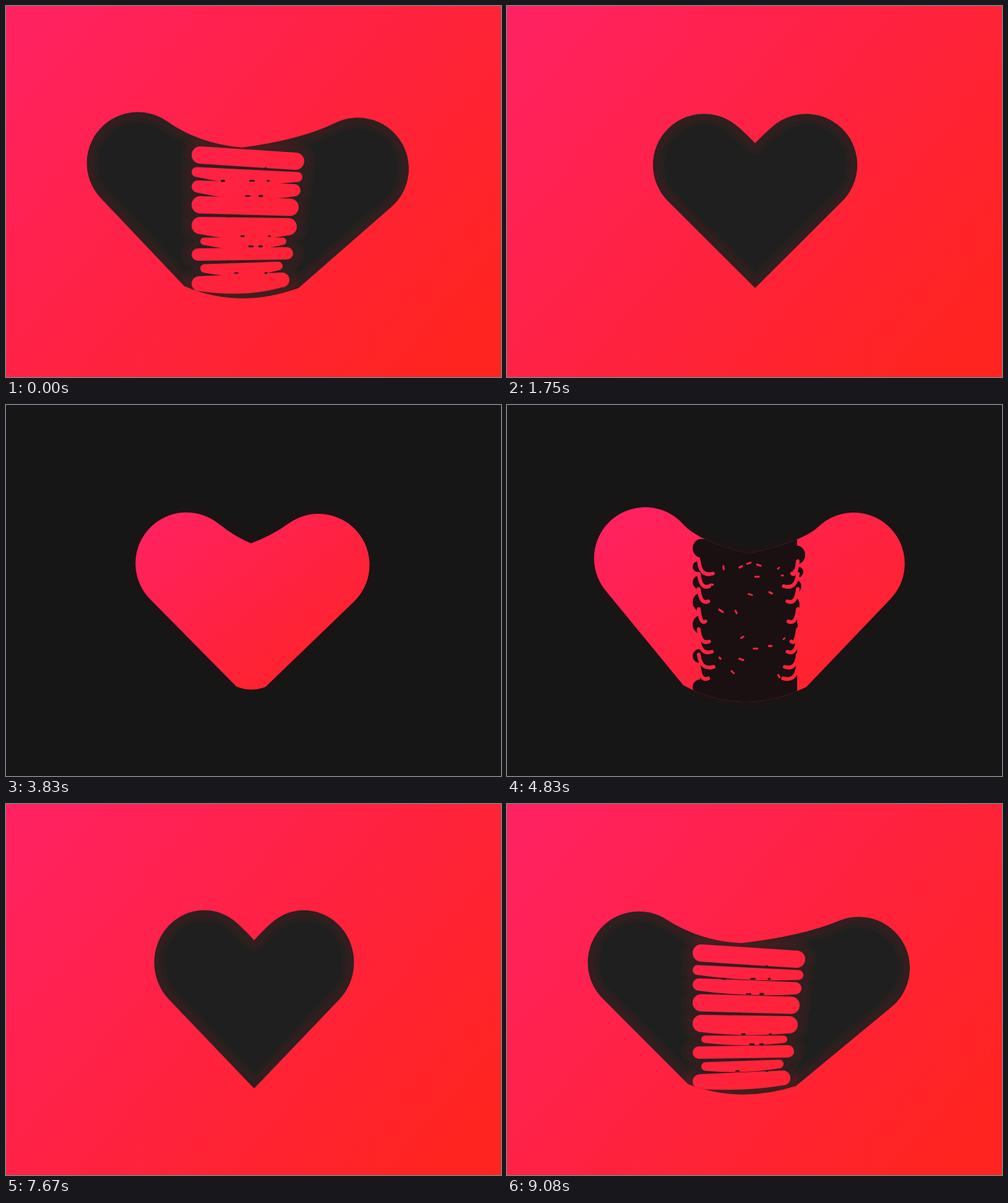
Animation of 800x600 px, one loop 9160 ms. Source, as an HTML page with a canvas:

```html
<!DOCTYPE html>
<html lang="en">
<head>
<meta charset="utf-8">
<title>Heart tearing apart</title>
<style>
  html, body { margin: 0; width: 100%; height: 100%; overflow: hidden; background: #161616; }
  canvas { display: block; width: 800px; height: 600px; }
</style>
</head>
<body>
<canvas id="stage" width="800" height="600"></canvas>
<script>
const ctx = document.getElementById('stage').getContext('2d');
const LOOP = 9160, HALF = LOOP / 2, SWAP = 2420;
const RADIUS = 82.5, MID_X = 386, MID_Y = 355;
const RIM = 'rgba(255, 40, 30, .04)';

const clamp = v => Math.min(1, Math.max(0, v));
const span = (p, from, to) => clamp((p - from) / (to - from));
const smooth = u => u * u * (3 - 2 * u);
const inOutCubic = u => u < .5 ? 4 * u ** 3 : 1 - 4 * (1 - u) ** 3;
const lerp = (a, b, u) => a + (b - a) * u;
const random = seed => { const v = Math.sin(seed * 12.9898) * 43758.5453; return v - Math.floor(v); };

// Slits opening between the strands, stacked from top to bottom; the strands get thinner ends.
const GAP = 4.5;
let rowTop = 232;
const ROWS = [14, 8, 10, 14, 14, 6, 10, 7, 12].map((r, i) => {
  const y = rowTop + r;
  rowTop += 2 * r + GAP;
  const indent = r < 8 ? 14 : 0;
  return { r, y, left: 300 + indent, right: 482 - 3 * i - indent, tilt: 5 - i, sag: i % 3 ? 14 : 0 };
});

function gradient(x0, y0, x1, y1) {
  const g = ctx.createLinearGradient(x0, y0, x1, y1);
  g.addColorStop(0, '#ff2264');
  g.addColorStop(.5, '#ff2242');
  g.addColorStop(1, '#ff2420');
  return g;
}
const RED_STAGE = gradient(0, 0, 685, 603);

// Diagonal gradient whose bands run parallel to the other diagonal of the box.
function boxGradient(x, y, w, h) {
  const k = 2 * w * h / (w * w + h * h);
  return gradient(x, y, x + k * h, y + k * w);
}

// How far the halves are apart, 1 = fully.
function apart(p) {
  return p < 2000 ? Math.max(0, 1 - ((p + 80) / 727) ** 3) : inOutCubic(span(p, 3530, 4290));
}

// Recoil of the halves: they sink a little while held and rise once torn.
function recoil(p) {
  return p < 2000 ? span(p, 0, 250) * (1 - span(p, 250, 600))
                  : -.35 * span(p, 3900, 4300) * (1 - span(p, 4500, HALF));
}

function poseAt(p) {
  const s = apart(p), k = recoil(p);
  return {
    left: [318.5 - 105.5 * s, 257 - 3 * s - 6.5 * k],
    right: [483.5 + 85 * s, 257 + 6 * s - 6 * k],
    leftBend: [390 - 80 * s - 8 * k, 210 + 12 * s],
    notch: [401 - 20 * s + 7 * k, 222 + 7 * s + 12 * k],
    rightBend: [412 + 66 * s + 6 * k, 210 + 6 * s + 6 * k],
    footLeft: [401 - 113 * s - 14 * k, 456 - 3 * s],
    foot: [401 - 24 * s, 456 + 35 * s + 18 * k],
    footRight: [401 + 72 * s + 18 * k, 456]
  };
}

function squash(p) {
  if (p < 2400) {
    const q = p - 833;
    const dent = q < 0 ? Math.sin(Math.PI / 2 * span(p, 647, 833))
                       : Math.exp(-q / 210) * Math.cos(2 * Math.PI * q / 400);
    return [1 - .218 * dent, 1 - .057 * dent];
  }
  const wind = smooth(span(p, 2900, 3400)) - smooth(span(p, 3500, 3850));
  return [1 - .07 * wind, 1 + .075 * wind];
}

// Angle on a lobe where a line to the given point touches it.
function tangent([cx, cy], [px, py], side) {
  const dx = px - cx, dy = py - cy;
  return Math.atan2(dy, dx) + side * Math.acos(Math.min(1, RADIUS / Math.hypot(dx, dy)));
}

function bodyPath({ left, right, leftBend, notch, rightBend, footLeft, foot, footRight }) {
  const path = new Path2D();
  path.arc(...left, RADIUS, tangent(left, footLeft, 1), tangent(left, leftBend, -1));
  path.quadraticCurveTo(...leftBend, ...notch);
  const from = tangent(right, rightBend, 1);
  path.quadraticCurveTo(...rightBend, right[0] + RADIUS * Math.cos(from), right[1] + RADIUS * Math.sin(from));
  path.arc(...right, RADIUS, from, tangent(right, footRight, -1));
  path.lineTo(...footRight);
  path.quadraticCurveTo(...foot, ...footLeft);
  path.closePath();
  return path;
}

function addSlit(path, row, open, sag) {
  const r = row.r * open, reach = .5 + .5 * open;
  const x0 = MID_X + (row.left - MID_X) * reach + r, x1 = MID_X + (row.right - MID_X) * reach - r;
  const y0 = row.y - row.tilt, y1 = row.y + row.tilt;
  path.moveTo(x0, y0 + r);
  path.arc(x0, y0, r, Math.PI / 2, -Math.PI / 2);
  path.arc(x1, y1, r, -Math.PI / 2, Math.PI / 2);
  path.quadraticCurveTo(MID_X, row.y + r + row.sag * sag, x0, y0 + r);
}

function addTear(path, width) {
  const left = lerp(MID_X, 312, width), right = lerp(MID_X, 469, width);
  path.moveTo(left, 456);
  path.lineTo(left, 233);
  path.quadraticCurveTo(MID_X, 254, right, 226);
  path.lineTo(right, 456);
  path.quadraticCurveTo(MID_X, 496, left, 456);
}

function holesPath(p) {
  const early = p < 2000;
  const open = early ? 1 : smooth(span(p, 3920, 4480));
  const path = new Path2D(), placed = new Path2D();
  if (open === 0 || early && p > 647) return path;
  ROWS.forEach(row => addSlit(path, row, open, early ? 1 : span(p, 4420, HALF)));
  if (early && p > 20) addTear(path, Math.sqrt(span(p, 20, 250)));
  const sx = early && p > 251 ? apart(p) / .905 : 1;
  const sy = early ? 1 + 2.5 * span(p, 245, 500) : 1;
  placed.addPath(path, new DOMMatrix([sx, 0, 0, sy, MID_X * (1 - sx), MID_Y * (1 - sy)]));
  return placed;
}

// Snapped strands hang from both edges of the opening.
function drawStubs(p) {
  const weight = 6 * span(p, 100, 250) * (1 - span(p, 270, 450));
  if (weight <= 0) return;
  ctx.lineWidth = weight;
  ROWS.slice(1).forEach((row, i) => {
    const y = row.y - row.r;
    for (const [edge, dir] of [[310, 1], [470, -1]]) {
      const length = 8 + 16 * random(i * 2 + dir);
      ctx.beginPath();
      ctx.moveTo(edge, y - 12);
      ctx.quadraticCurveTo(edge + dir * 3, y + 14, edge + dir * length, y + 8);
      ctx.stroke();
    }
  });
}

function crumb(x, y, dx, dy, weight) {
  ctx.lineWidth = weight;
  ctx.beginPath();
  ctx.moveTo(x - dx, y - dy);
  ctx.lineTo(x + dx, y + dy);
  ctx.stroke();
}

function drawCrumbs(p) {
  const early = p < 2000;
  if (!early && p < 4420) return;
  const loose = early ? span(p, 0, 250) : 0;
  const fall = early ? 300 * (Math.max(0, p - 250) / 583) ** 2 : 0;
  for (let i = 0; i < 18; i++) {
    const row = ROWS[1 + i % 8];
    const x = MID_X + (random(i + 1) - .5) * lerp(80, 125, loose);
    const y = row.y - row.r - GAP / 2 + (random(i + 40) - .5) * 18 * loose;
    crumb(x, y + fall * 1.4, 1 + i % 3, (i % 4 - 1) * loose, 2.5 + random(i));
  }
  // Slower ones shaken out of the lobes.
  if (early && p > 250) for (let i = 0; i < 6; i++) {
    crumb(236 + 57 * i, 274 - 24 * random(i + 3) + fall, i % 3 ? .3 : 3, i % 3 ? 2.5 : 1, 3);
  }
}

function draw(t) {
  const p = t % HALF;
  const dark = t >= SWAP && t < SWAP + HALF;
  const pose = poseAt(p), body = bodyPath(pose), holes = holesPath(p);
  const [sx, sy] = squash(p);
  const stage = dark ? '#161616' : RED_STAGE;
  const edge = pose.left[0] - RADIUS, top = pose.left[1] - RADIUS;
  const goo = dark
    ? boxGradient(edge, top, pose.right[0] + RADIUS - edge, (pose.foot[1] + pose.footLeft[1]) / 2 - top)
    : '#1f1f1f';

  ctx.fillStyle = stage;
  ctx.fillRect(0, 0, 800, 600);

  ctx.save();
  ctx.translate(401, 290);
  ctx.scale(sx, sy);
  ctx.translate(-401, -290);
  if (dark) {
    ctx.shadowColor = 'rgba(45, 12, 14, .4)';
    ctx.shadowBlur = 30;
  }
  ctx.fillStyle = goo;
  ctx.fill(body);
  ctx.shadowColor = 'transparent';
  ctx.clip(body);
  if (!dark) {
    ctx.strokeStyle = RIM;
    for (const width of [36, 22]) {
      ctx.lineWidth = width;
      ctx.stroke(body);
      ctx.stroke(holes);
    }
  }
  ctx.fillStyle = dark ? '#1a1011' : stage;
  ctx.fill(holes);
  ctx.restore();

  ctx.strokeStyle = dark ? goo : '#2a1d1e';
  ctx.lineCap = ctx.lineJoin = 'round';
  if (p < 600) drawStubs(p);
  drawCrumbs(p);
}

// The motion advances twelve times a second.
function tick() {
  const t = performance.now() % LOOP;
  draw(Math.floor((t + 4) * .012) / .012 % LOOP);
  requestAnimationFrame(tick);
}
tick();
</script>
</body>
</html>
```
